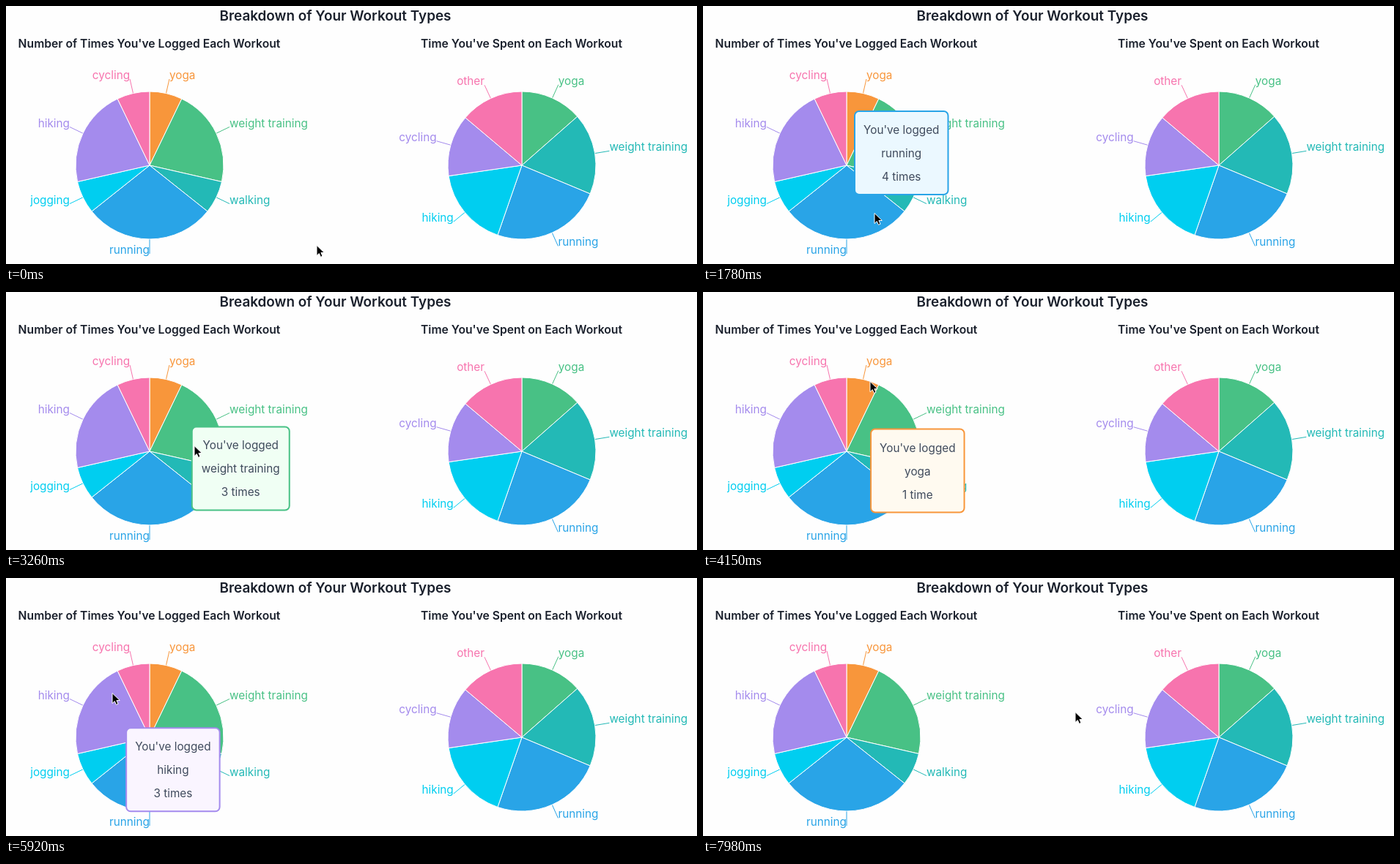
An HTML page for the animation above (8 s loop, 943 px wide and 353 px high).

```html
<!DOCTYPE html>
<html lang="en">
<head>
<meta charset="utf-8">
<title>Workout types</title>
<style>
  html, body { margin: 0; width: 100%; height: 100%; overflow: hidden; background: #fefefe; }
  svg { display: block; }
  text { font: 15.3px Inter, "Noto Sans", sans-serif; }
  .title, .sub { font-weight: 600; fill: #1a202c; text-anchor: middle; }
  .title { font-size: 18.9px; }
  .sub { font-size: 15.7px; }
  .tip text { fill: #3f4a5c; text-anchor: middle; }
</style>
</head>
<body>
<svg width="943" height="353" viewBox="0 0 943 353">
  <text class="title" x="449.5" y="20">Breakdown of Your Workout Types</text>
  <text class="sub" x="195.5" y="57">Number of Times You've Logged Each Workout</text>
  <text class="sub" x="703.5" y="57">Time You've Spent on Each Workout</text>
  <g id="pies"></g>
  <g id="tip" class="tip">
    <rect x="1" y="1" height="114" rx="6" stroke-width="2"/>
    <text y="32">You've logged</text>
    <text y="64"></text>
    <text y="96"></text>
  </g>
  <path id="cursor" d="M0 .5V14.6L3.3 11.5L5.5 16.4L8 15.3L5.9 10.5H10.3Z"
        fill="#000" stroke="#fff" stroke-width="1" stroke-linejoin="round"/>
</svg>
<script>
const LOOP = 8000, FIRST = 588, STEP = 147.8, SLIDE = 400;
const C = {
  orange: '#f8963b', green: '#48c185', teal: '#23b9b6', blue: '#29a4e7',
  cyan: '#00cef0', purple: '#a48bed', pink: '#f774ae'
};

// Pies: each slice is [label, colour, end angle in degrees]
const turn = n => n * 360 / 14;
const pies = [
  [196, [['yoga', C.orange, turn(1)], ['weight training', C.green, turn(4)],
    ['walking', C.teal, turn(5)], ['running', C.blue, turn(9)], ['jogging', C.cyan, turn(10)],
    ['hiking', C.purple, turn(13)], ['cycling', C.pink, 360]]],
  [704, [['yoga', C.green, 48.6], ['weight training', C.teal, 112.7], ['running', C.blue, 199.1],
    ['hiking', C.cyan, 261.7], ['cycling', C.purple, 310.2], ['other', C.pink, 360]]]
];

function drawPie([cx, slices]) {
  const at = (deg, r) => {
    const a = deg * Math.PI / 180;
    return [(cx + r * Math.sin(a)).toFixed(2), (218 - r * Math.cos(a)).toFixed(2)];
  };
  let from = 0, wedges = '', labels = '';
  for (const [name, color, to] of slices) {
    const mid = (from + to) / 2, [x, y] = at(mid, 121);
    const big = to - from > 180 ? 1 : 0;
    wedges += `<path d="M${cx} 218L${at(from, 101)}A101 101 0 ${big} 1 ${at(to, 101)}Z" fill="${color}" stroke="#fff"/>`;
    labels += `<path d="M${at(mid, 101)}L${x} ${y}" stroke="${color}"/>
      <text x="${x}" y="${y}" fill="${color}" text-anchor="${mid < 179.9 ? 'start' : 'end'}">${name}</text>`;
    from = to;
  }
  return labels + wedges;
}
document.getElementById('pies').innerHTML = pies.map(drawPie).join('');

// Tooltips: resting place, colours, count, width
const tips = {
  running: { x: 206, y: 143, color: C.blue, bg: '#ebf8ff', n: 4 },
  walking: { x: 252, y: 114, color: C.teal, bg: '#e6fffa', n: 1 },
  'weight training': { x: 253, y: 206, color: C.green, bg: '#f0fff4', n: 3, w: 135 },
  yoga: { x: 219, y: 179.5, color: C.orange, bg: '#fffaf0', n: 1 },
  cycling: { x: 195.5, y: 179.5, color: C.pink, bg: '#fff5f7', n: 1 },
  hiking: { x: 161, y: 206, color: C.purple, bg: '#faf5ff', n: 3 }
};
const hovers = [[1280, 'running'], [2505, 'walking'], [3066, 'weight training'], [3960, 'yoga'],
  [4595, 'cycling'], [5631, 'hiking'], [6660, 'cycling'], [6740, 'yoga'],
  [6840, 'weight training'], [7020, null]];

// Pointer: [step, x, y]
const track = [[-1, 424, 327], [0, 421, 327], [1, 412, 325], [2, 395, 321], [3, 362, 315],
  [4, 305, 304], [5, 240, 289], [6, 235, 284], [7, 234, 283], [9, 234, 283], [10, 238, 282],
  [12, 256, 275], [13, 265, 269], [14, 270, 262], [15, 273, 255], [16, 271, 245], [17, 264, 228],
  [18, 257, 210], [20, 250, 182], [22, 240, 142], [23, 233, 126], [24, 228, 122], [25, 222, 134],
  [27, 200, 136], [28, 186, 135], [29, 180, 134], [31, 179, 134], [32, 176, 136], [34, 160, 146],
  [36, 145, 157], [39, 146, 156], [40, 152, 157], [41, 172, 163], [42, 213, 172], [43, 262, 180],
  [44, 325, 185], [45, 385, 187], [46, 435, 187], [47, 468, 187], [48, 490, 186], [50, 508, 183]];

const mix = (a, b, p) => a + (b - a) * p;

// The CSS "ease" curve
function ease(x) {
  if (x >= 1) return 1;
  let lo = 0, hi = 1;
  for (let i = 0; i < 24; i++) {
    const s = (lo + hi) / 2;
    if (.75 * s * (1 - s) + s ** 3 < x) lo = s; else hi = s;
  }
  return .3 * lo * (1 - lo) ** 2 + 3 * (1 - lo) * lo * lo + lo ** 3;
}

// Each slide starts from wherever the previous one had got to
function tipAt(t) {
  let { x, y } = tips['weight training'], name = null;
  hovers.forEach(([start, next], i) => {
    if (t < start) return;
    name = next;
    if (!next) return;
    const end = Math.min(t, hovers[i + 1][0]);
    const p = ease((end - start) / SLIDE);
    x = mix(x, tips[next].x, p);
    y = mix(y, tips[next].y, p);
  });
  return { name, x, y };
}

function pointerAt(step) {
  const i = track.findIndex(k => k[0] >= step);
  const b = track[i], a = track[Math.max(0, i - 1)];
  const p = b === a ? 0 : (step - a[0]) / (b[0] - a[0]);
  return [mix(a[1], b[1], p), mix(a[2], b[2], p)].map(Math.round);
}

const tip = document.getElementById('tip'), cursor = document.getElementById('cursor');
const box = tip.querySelector('rect'), lines = tip.querySelectorAll('text');

function render(time) {
  const step = Math.max(-1, Math.floor((time - FIRST) / STEP));
  cursor.setAttribute('transform', `translate(${pointerAt(step)})`);

  const { name, x, y } = tipAt(FIRST + step * STEP);
  tip.style.display = name ? '' : 'none';
  if (!name) return;
  const { color, bg, n, w = 129.5 } = tips[name];
  tip.setAttribute('transform', `translate(${x} ${y})`);
  box.setAttribute('width', w - 2);
  box.setAttribute('fill', bg);
  box.setAttribute('stroke', color);
  lines.forEach(line => line.setAttribute('x', w / 2));
  lines[1].textContent = name;
  lines[2].textContent = n + (n > 1 ? ' times' : ' time');
}

const begin = performance.now();
function tick() {
  render((performance.now() - begin) % LOOP);
  requestAnimationFrame(tick);
}
tick();
</script>
</body>
</html>
```
